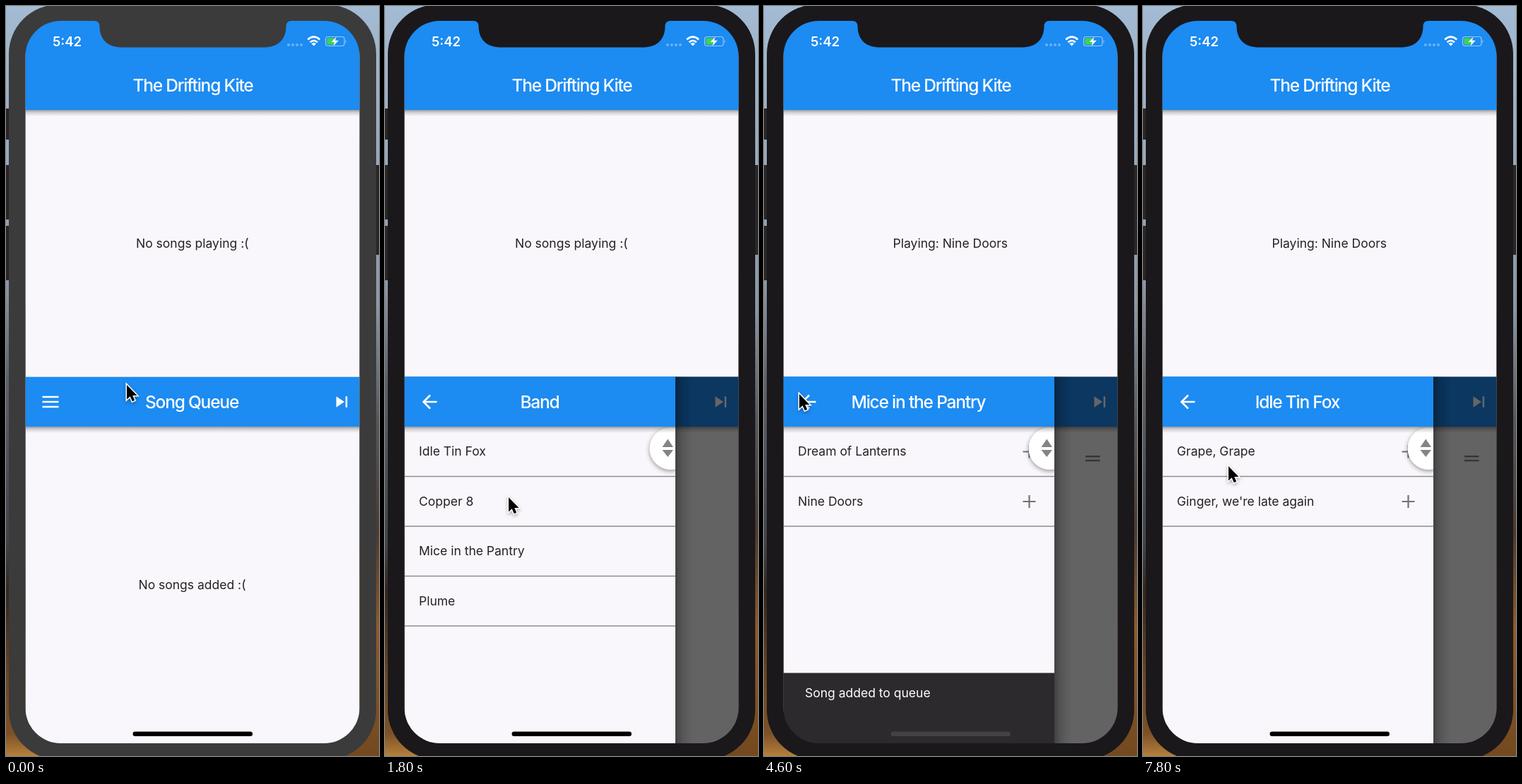
Animation, 528 px wide and 1061 px high, one loop 8 s. Source, as an HTML page:

```html
<!DOCTYPE html>
<html lang="en">
<head>
<meta charset="utf-8">
<title>Song queue</title>
<style>
  html, body { margin: 0; width: 100%; height: 100%; overflow: hidden; background: #a3bbd3; }
  svg { display: block; width: 100vw; height: 100vh; }
  text { font: 400 17.5px Inter, "Open Sans", sans-serif; fill: #232124; }
  .mid { text-anchor: middle; }
  .title { font-size: 24.5px; font-weight: 500; letter-spacing: -1.2px; fill: #fff; }
  .label { font-size: 25px; font-weight: 700; fill: #fff; }
  .clock { font-size: 18.5px; font-weight: 600; fill: #fff; }
  .snack { fill: #fff; }
  .line { fill: none; stroke: #fff; stroke-width: 2.6; }
  .rule { stroke: #8f8d90; stroke-width: 1.3; }
  .plus { fill: none; stroke: #747275; stroke-width: 2.2; }
  .soft { filter: drop-shadow(0 2px 2px rgba(0, 0, 0, .3)); }
  .raised { filter: drop-shadow(0 2px 3px rgba(0, 0, 0, .4)); }
</style>
</head>
<body>
<svg id="stage" viewBox="0 0 528 1061"></svg>
<script>
const LOOP = 8000, STEP = 200;
const BLUE = '#1c8bf2', PAPER = '#f9f7fb';
const BANDS = ['Idle Tin Fox', 'Copper 8', 'Mice in the Pantry', 'Plume'];
const FIRST_SONGS = ['Dream of Lanterns', 'Nine Doors'];
const NEXT_SONGS = ['Grape, Grape', "Ginger, we're late again"];

// Screen edges, and the top of its lower half.
const LEFT = 27.5, TOP = 20, WIDTH = 473, MIDDLE = 524.4, HALF = 520, PANEL = 383.5;

const rect = (x, y, w, h, fill, rx = 0, more = '') =>
  `<rect x="${x}" y="${y}" width="${w}" height="${h}" fill="${fill}" rx="${rx}" ${more}/>`;
const path = (d, more = 'class="line"') => `<path d="${d}" ${more}/>`;
const text = (x, y, words, cls = '', id = '') =>
  `<text x="${x}" y="${y}" class="${cls}" id="${id}">${words}</text>`;
const group = (id, ...parts) => `<g id="${id}">${parts.join('')}</g>`;
const gradient = (id, stops, across = false) =>
  `<linearGradient id="${id}" x2="${+across}" y2="${+!across}">` +
  stops.map(([at, color, alpha = 1]) =>
    `<stop offset="${at}" stop-color="${color}" stop-opacity="${alpha}"/>`).join('') +
  '</linearGradient>';

const bar = (y, w, h) =>
  rect(LEFT, y + h, w, 9, 'url(#below)') + rect(LEFT, y, w, h, BLUE);

const rows = (names, plus) => names.map((name, i) => {
  const y = 630 + 70.5 * i;
  return text(48, y + 6.3, name) +
    path(`M27 ${y + 35.5}H411`, 'class="rule"') +
    (plus ? path(`M366.5 ${y + .5}h18m-9 -9v18`, 'class="plus"') : '');
}).join('');

const button = (y, label) =>
  rect(71, y, 297, 151, '#35bbff', 30, 'class="soft"') + text(219.5, y + 84, label, 'label mid');

const defs = '<defs>' +
  gradient('left', [[0, '#a3bbd3'], [.36, '#8f9aa8'], [.5, '#5c6168'], [.72, '#3f4247'],
    [.78, '#33261f'], [.9, '#6d4723'], [.97, '#7d5126'], [1, '#b5803c']]) +
  gradient('right', [[0, '#a3bbd3'], [.4, '#8b98a6'], [.55, '#55585d'], [.7, '#4a3a30'],
    [.83, '#8f5a28'], [1, '#73491f']]) +
  gradient('below', [[0, '#000', .38], [.4, '#000', .16], [1, '#000', 0]]) +
  gradient('beside', [[0, '#000', .34], [.4, '#000', .13], [1, '#000', 0]], true) +
  `<clipPath id="lower">${rect(LEFT, MIDDLE, WIDTH, HALF)}</clipPath>` +
  `<clipPath id="panel">${rect(LEFT, MIDDLE, PANEL, HALF)}</clipPath></defs>`;

const backdrop =
  rect(0, 0, 264, 1061, 'url(#left)') + rect(264, 0, 264, 1061, 'url(#right)') +
  [[0, 145, 44], [0, 225, 77], [0, 311, 77], [520, 225, 127]]
    .map(([x, y, h]) => rect(x, y, 8, h, '#282627')).join('');

const status =
  text(66, 56.5, '5:42', 'clock') +
  [400, 406, 412, 418].map(x => `<circle cx="${x}" cy="55" r="2" fill="#fff" opacity=".35"/>`).join('') +
  path('M427.2 47.4Q435.7 40 444.2 47.4M430.5 51.2Q435.7 46.8 440.9 51.2') +
  path('M432.4 53.2Q435.7 50.6 439 53.2L435.7 56.6Z', 'fill="#fff"') +
  rect(452.5, 43.5, 26.5, 13, 'none', 3.5, 'stroke="#fff" stroke-opacity=".55" stroke-width="1.2"') +
  rect(454.3, 45.3, 11.5, 9.4, '#3fd158', 2) +
  path('M480.6 48q2 2 0 4.4Z', 'fill="#fff" opacity=".6"') +
  path('M467.5 43.8L460.5 51H465L463.5 56.5L470.8 48.8H466Z', 'fill="#fff"');

const upper =
  rect(LEFT, TOP, WIDTH, 1025, PAPER) + bar(TOP, WIDTH, 127) + status +
  text(264.5, 120.5, 'The Drifting Kite', 'title mid') +
  text(263.8, 341.6, 'No songs playing :(', 'mid', 'idle') +
  text(263.8, 341.6, 'Playing: Nine Doors', 'mid', 'playing');

const queue =
  text(263.5, 825, 'No songs added :(', 'mid', 'empty') +
  group('grip', path('M455 637.3h20.5m-20.5 5.7h20.5', 'stroke="#8a888b" stroke-width="2.4"')) +
  bar(MIDDLE, WIDTH, 70.6) + text(263, 568.6, 'Song Queue', 'title mid') +
  path('M51.5 553h23m-23 7h23m-23 7h23') +
  path('M467.5 552.2L479 560L467.5 567.8ZM480.6 552.2h2.6v15.6h-2.6Z', 'fill="#fff"');

const thumb =
  '<circle cx="404.5" cy="626" r="30" fill="#fff" class="raised"/>' +
  path('M392.5 624L400.3 612.5L408 624ZM392.5 628L400.3 638L408 628Z', 'fill="#858386"');

const drawer = group('drawer',
  rect(LEFT + PANEL, MIDDLE, 24, HALF, 'url(#beside)'),
  '<g clip-path="url(#panel)">',
  rect(LEFT, MIDDLE, PANEL, HALF, PAPER),
  group('menu', button(625.5, 'Bands'), button(837, 'Other Singers')),
  group('bands', rows(BANDS, false)),
  group('firstSongs', rows(FIRST_SONGS, true)),
  group('nextSongs', rows(NEXT_SONGS, true)),
  group('thumb', thumb),
  bar(MIDDLE, PANEL, 70.6),
  group('back', path('M73.5 560H55M64 550.5L54.5 560L64 569.5')),
  text(219, 568.6, 'Menu', 'title mid', 'menuTitle'),
  text(219, 568.6, 'Band', 'title mid', 'bandTitle'),
  text(218.5, 568.6, BANDS[2], 'title mid', 'firstTitle'),
  text(218.5, 568.6, BANDS[0], 'title mid', 'nextTitle'),
  group('snack', rect(LEFT, 943.5, PANEL, 102, '#2c2a2d'), text(58, 977.5, 'Song added to queue', 'snack')),
  '</g>');

const bezel = path(
  'M74 -2H454A70 70 0 0 1 524 68V996A70 70 0 0 1 454 1066H74A70 70 0 0 1 4 996V68A70 70 0 0 1 74 -2Z' +
  'M77.5 21A50 50 0 0 0 27.5 71V993A50 50 0 0 0 77.5 1043H450.5A50 50 0 0 0 500.5 993V71A50 50 0 0 0 450.5 21' +
  'H404Q396.5 21 396.5 29C396 49 384 58.5 364 58.5H165C145 58.5 133 49 132.5 29Q132.5 21 125 21Z',
  'id="bezel" fill-rule="evenodd"');

const cursor = group('cursor', path('M0 0V20.5L4.7 16.2L7.8 23.2L11.2 21.8L8.2 15H14.5Z',
  'class="soft" fill="#000" stroke="#fff" stroke-width="3" paint-order="stroke"'));

document.getElementById('stage').innerHTML =
  defs + backdrop + upper +
  `<g clip-path="url(#lower)">${queue}${rect(LEFT, MIDDLE, WIDTH, HALF, '#000', 0, 'id="scrim"')}${drawer}</g>` +
  rect(179.5, 1026.5, 169.5, 6.5, '#000', 3.25, 'id="home"') + bezel + cursor;

// Each step is [ms, value]; a value holds until the next step.
function play(id, prop, steps) {
  const frames = steps.map(([ms, value]) => ({ offset: ms / LOOP, [prop]: value, easing: 'step-end' }));
  frames.push({ offset: 1, [prop]: steps[steps.length - 1][1] });
  document.getElementById(id).animate(frames, { duration: LOOP, iterations: Infinity });
}

// Visible from the first time to the second, from the third to the fourth, and so on.
function show(id, ...flips) {
  const steps = flips.map((ms, i) => [ms, (i + 1) % 2]);
  play(id, 'opacity', flips[0] ? [[0, 0], ...steps] : steps);
}

play('bezel', 'fill', [[0, '#3b3b3b'], [200, '#1a181b']]);
play('drawer', 'transform', [[0, -410], [800, -256], [1000, 0]]
  .map(([ms, x]) => [ms, `translate(${x}px, 0px)`]));
play('scrim', 'opacity', [[0, 0], [800, .2], [1000, .6]]);
play('snack', 'transform', [[0, 102], [3800, 55], [4000, 0], [5000, 50], [5200, 102]]
  .map(([ms, y]) => [ms, `translate(0px, ${y}px)`]));
play('home', 'fill', [[0, '#000'], [4000, '#434144'], [5000, '#000']]);

show('idle', 0, 3800);
show('empty', 0, 3800);
show('playing', 3800);
show('grip', 3800);
show('menu', 0, 1600);
show('menuTitle', 0, 1600);
show('back', 1600);
show('thumb', 1600);
show('bands', 1600, 2400, 5000, 6600);
show('bandTitle', 1600, 2400);
show('firstSongs', 2400, 5000);
show('firstTitle', 2400, 6600);
show('nextSongs', 6600);
show('nextTitle', 6600);

const trail = [
  [0, 171, 536], [200, 164, 541], [600, 73, 562], [1000, 72, 562], [1400, 180, 690],
  [1800, 175, 695], [2200, 170, 765], [2600, 168, 766], [3000, 170, 736], [3400, 340, 700],
  [3600, 368, 695], [3800, 368, 695], [4200, 230, 620], [4600, 50, 549], [5000, 50, 550],
  [5600, 103, 670], [6000, 112, 645], [6600, 112, 635], [7800, 121, 651], [8000, 121, 651]
];
function pointer(ms) {
  const i = trail.findIndex(([end]) => end > ms);
  const [t0, x0, y0] = trail[i - 1], [t1, x1, y1] = trail[i];
  const k = (ms - t0) / (t1 - t0);
  return `translate(${x0 + (x1 - x0) * k}px, ${y0 + (y1 - y0) * k}px)`;
}
play('cursor', 'transform',
  Array.from({ length: LOOP / STEP }, (_, i) => [i * STEP, pointer(i * STEP)]));
</script>
</body>
</html>
```
